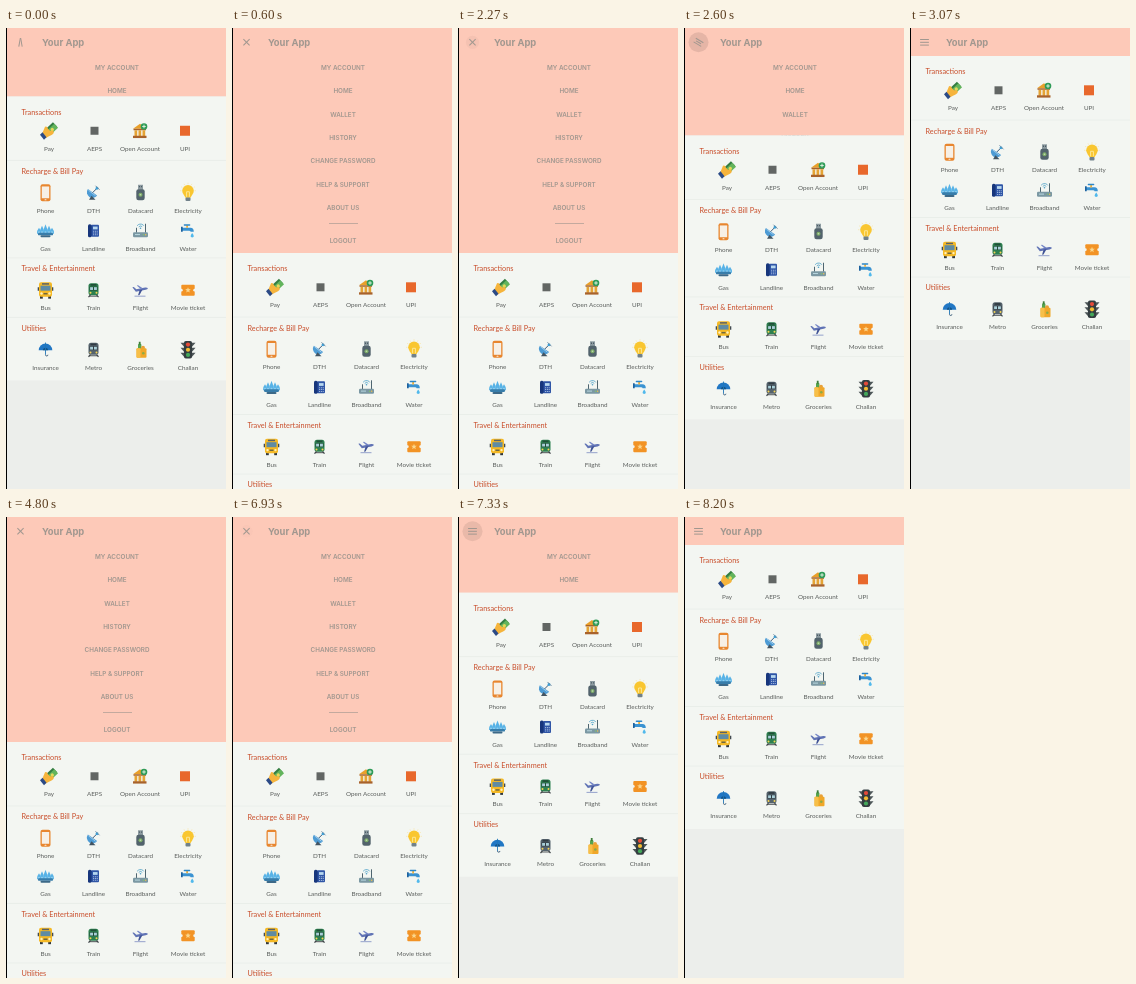
Recreate the animation shown at these times as an HTML page with a canvas. Size 220 by 461 pixels, loop 8.27 s.

```html
<!DOCTYPE html>
<html lang="en">
<head>
<meta charset="utf-8">
<title>Backdrop menu</title>
<style>
html, body { margin: 0; width: 100%; height: 100%; overflow: hidden; background: #eceeeb; }
canvas { display: block; width: 220px; height: 461px; }
</style>
</head>
<body>
<canvas id="stage"></canvas>
<script>
const W = 220, H = 461, LOOP = 8270;
const SLIDE = 740, SPIN = 350;
const CLOSED = 28, OPENED = 225;
const INK = '#a1978f', PINK = '#fdc9b8';
const LABEL_FONT = 'Lato, "Open Sans", sans-serif';
const MENU_FONT = 'Inter, "Open Sans", sans-serif';
const moves = [[-175, 1], [2310, 0], [4072, 1], [6970, 0]];
const presses = [2240, 4060, 6920];

const canvas = document.getElementById('stage');
const dpr = window.devicePixelRatio || 1;
canvas.width = W * dpr;
canvas.height = H * dpr;
const ctx = canvas.getContext('2d');

const clamp = (v) => Math.max(0, Math.min(1, v));

// cubic-bezier(.4, 0, .2, 1), solved by bisection
function ease(u) {
  let lo = 0, hi = 1, s = u;
  for (let i = 0; i < 24; i++) {
    s = (lo + hi) / 2;
    const x = 1.2 * s * (1 - s) ** 2 + 0.6 * s * s * (1 - s) + s ** 3;
    if (x < u) lo = s; else hi = s;
  }
  return 3 * s * s - 2 * s ** 3;
}

function rect(color, x, y, w, h, r = 0) {
  ctx.fillStyle = color;
  ctx.beginPath();
  ctx.roundRect(x, y, w, h, r);
  ctx.fill();
}

function disc(color, x, y, r, from = 0, to = Math.PI * 2) {
  ctx.fillStyle = color;
  ctx.beginPath();
  ctx.arc(x, y, r, from, to);
  ctx.fill();
}

function trace(pts) {
  ctx.beginPath();
  for (let i = 0; i < pts.length; i += 2) ctx.lineTo(pts[i], pts[i + 1]);
}

function poly(color, ...pts) {
  ctx.fillStyle = color;
  trace(pts);
  ctx.fill();
}

function line(color, width, ...pts) {
  ctx.strokeStyle = color;
  ctx.lineWidth = width;
  trace(pts);
  ctx.stroke();
}

function arc(color, width, x, y, r, from, to) {
  ctx.strokeStyle = color;
  ctx.lineWidth = width;
  ctx.beginPath();
  ctx.arc(x, y, r, from, to);
  ctx.stroke();
}

function path(color, d) {
  ctx.fillStyle = color;
  ctx.fill(new Path2D(d));
}

function at(x, y, angle, draw) {
  ctx.save();
  ctx.translate(x, y);
  ctx.rotate(angle);
  draw();
  ctx.restore();
}

function text(str, x, y, font, color, align = 'center') {
  ctx.font = font;
  ctx.fillStyle = color;
  ctx.textAlign = align;
  ctx.fillText(str, x, y);
}

function trainFront(body, trim) {
  rect(body, -5, -7, 10, 12, 2.5);
  rect(trim, -3, -6.2, 6, 1.8);
  rect(trim, -4, -3.6, 8, 4);
  rect('#a9cfd8', -3.4, -3, 2.9, 2.8);
  rect('#a9cfd8', 0.5, -3, 2.9, 2.8);
  disc('#f7d455', -3, 2.7, 1);
  disc('#f7d455', 3, 2.7, 1);
  line('#3d4246', 1.2, -3, 4.8, -5, 7);
  line('#3d4246', 1.2, 3, 4.8, 5, 7);
  line('#3d4246', 0.9, -4, 6, 4, 6);
}

const icons = {
  Pay() {
    at(3, -1.5, -0.75, () => {
      rect('#347d42', -5.5, -4.5, 11, 6);
      rect('#62b45c', -5.5, -2.5, 11, 5.5);
      disc('#e4d75a', 0, 0.4, 1.7);
    });
    path('#f6b43c', 'M-6.5 2L-4 -4Q-2 -5 -1 -2L1 0L4 0Q6 2 3 4L-1 6L-3.5 7.5Z');
    poly('#2b4a86', -9, 4, -6.5, 1.5, -2.5, 6.5, -5, 9);
  },
  AEPS() { rect('#626664', -4, -4, 8, 8); },
  'Open Account'() {
    poly('#e9a02b', -7, -2, 0, -7, 6, -2);
    rect('#a8622b', -6.5, -2, 12.5, 1.5);
    for (const x of [-5.5, -1.5, 2.5]) rect('#e5a334', x, -0.5, 2.7, 6);
    rect('#a8622b', -7, 5, 13.5, 2.3);
    disc('#2e9b57', 4, -4.3, 3.3);
    line('#e8f5e8', 0.9, 2.2, -4.3, 5.8, -4.3);
    line('#e8f5e8', 0.9, 4, -6.1, 4, -2.5);
  },
  UPI() { rect('#e8682c', -5, -5, 10, 10); },
  Phone() {
    rect('#e8862f', -5, -8.5, 10, 17, 2);
    rect('#f7f0e6', -3.7, -6.3, 7.4, 11.8);
    rect('#f7f0e6', -1, 6.4, 2, 1, 0.5);
  },
  DTH() {
    disc('#4d9bd4', -1, -0.5, 5.6, 0.6, 0.6 + Math.PI);
    line('#38597a', 1, -1, 0, 3.5, -4.5);
    disc('#35a2dd', 3.5, -4.5, 1.4);
    line('#6f8ba2', 1, 2, -7, 6, -3);
    poly('#425462', -2, 3, 2, 7, -4.5, 7);
    line('#a6d0ea', 0.9, -5, -2.5, 2, 3);
  },
  Datacard() {
    rect('#8d9ba1', -2.5, -8, 5, 5);
    rect('#4c5c65', -1.5, -6.7, 1, 1.3);
    rect('#4c5c65', 0.5, -6.7, 1, 1.3);
    rect('#52636c', -4.2, -3.5, 8.4, 11, 2.2);
    disc('#7dae67', 0, 2, 2);
    disc('#c4d8ba', 0, 2, 0.8);
  },
  Electricity() {
    for (let i = 0; i < 7; i++) {
      const a = Math.PI * (1 + i / 6), c = Math.cos(a), s = Math.sin(a);
      line('#f8e7b0', 0.8, 6.5 * c, -2 + 6.5 * s, 8 * c, -2 + 8 * s);
    }
    disc('#f9c630', 0, -2, 5.8);
    poly('#f9c630', -4.5, 1.5, 4.5, 1.5, 2.5, 5, -2.5, 5);
    rect('#71818a', -2.5, 4.8, 5, 3.4, 1);
    line('#fdeaa0', 0.9, -1.4, 4, -1.4, -1, 1.4, -1, 1.4, 4);
  },
  Gas() {
    for (const [x, h] of [[-6.5, 6], [-3.5, 8], [0, 9.5], [3.5, 8], [6.5, 6]]) {
      path('#57b2e6', `M${x - 2} 3Q${x - 2.5} ${3 - h / 2} ${x} ${3 - h}Q${x + 2.5} ${3 - h / 2} ${x + 2} 3Z`);
      disc('#8fcdee', x, 1.5, 1);
    }
    rect('#387daa', -7.5, 2, 15, 2.6, 1.2);
    rect('#3c6988', -5, 4.6, 10, 2, 1);
  },
  Landline() {
    rect('#2f55a6', -2.5, -6, 8, 12, 1);
    rect('#17367c', -5.5, -6.5, 3.6, 13, 1.6);
    rect('#b6d7ef', -0.5, -4.2, 4.6, 2.8);
    for (let i = 0; i < 9; i++) rect('#a9bfe0', -0.4 + (i % 3) * 1.8, 0 + Math.floor(i / 3) * 1.8, 1, 1);
  },
  Broadband() {
    line('#4e6570', 1, -4, 2, -4, -3);
    line('#4e6570', 1, 5, 2, 5, -7);
    for (const r of [2.2, 4.2]) arc('#4ba0c7', 0.8, 0, -2.5, r, -2.5, -0.64);
    disc('#4ba0c7', 0, -2.5, 0.8);
    rect('#7b98a3', -7.5, 1.5, 15, 5, 1.2);
    rect('#b9d7df', -5.5, 3.3, 5, 1);
    disc('#80c36a', 3, 4, 0.7);
    disc('#f3c247', 5.2, 4, 0.7);
  },
  Water() {
    path('#3a93d2', 'M-6.5 -3H2.5Q5.8 -3 5.8 1H2.6Q2.6 0 1 0H-6.5Z');
    rect('#1d629f', -7, -4, 1.7, 5);
    rect('#f0b23c', -1.8, -5.5, 1.8, 2.6);
    rect('#2c86c8', -4.3, -6.6, 6.6, 1.5, 0.7);
    path('#51b9ec', 'M4.2 2.3Q7.4 6.5 4.2 6.8Q1 6.5 4.2 2.3Z');
  },
  Bus() {
    rect('#30383e', -5.5, 5, 2.8, 3.5);
    rect('#30383e', 2.7, 5, 2.8, 3.5);
    rect('#f5b925', -6.5, -8, 13, 14.5, 2);
    rect('#5a6268', -3.5, -7, 7, 1.5);
    rect('#5f8ba3', -5, -4.5, 10, 5);
    disc('#fff1bd', -4, 3.4, 1.2);
    disc('#fff1bd', 4, 3.4, 1.2);
    rect('#6d6640', -2, 2.8, 4, 1.5);
    rect('#424a50', -7.8, -3, 1.3, 3.5);
    rect('#424a50', 6.5, -3, 1.3, 3.5);
  },
  Train() { trainFront('#2d8050', '#204f38'); },
  Flight() {
    at(0, -0.5, -0.2, () => {
      path('#6073b5', 'M-7.5 -4L-6 -4L-4 -1.2H5Q7.5 -0.8 7.5 0.3Q7 1.2 5 1.2H-5Z');
      poly('#3f5295', -1, 0.3, 2, 0.3, -2, 5, -3.5, 5);
      poly('#7384c5', 0, -1, 2.5, -1, -1.5, -4.8, -2.8, -4.8);
    });
    line('#8b98c8', 0.9, -6, 6, 5, 6);
  },
  'Movie ticket'() {
    rect('#f29325', -6.7, -5.5, 13.4, 11, 1);
    disc('#f3f6f2', -6.7, 0, 1.4);
    disc('#f3f6f2', 6.7, 0, 1.4);
    const star = [];
    for (let i = 0; i < 10; i++) {
      const a = i * Math.PI / 5 - Math.PI / 2, r = i % 2 ? 1.3 : 3;
      star.push(r * Math.cos(a), r * Math.sin(a));
    }
    poly('#fbd68c', ...star);
  },
  Insurance() {
    disc('#2177c4', 0, 0.5, 6.8, Math.PI, Math.PI * 2);
    disc('#135489', 0, 0.5, 2.6, Math.PI, Math.PI * 2);
    line('#2177b7', 0.9, 0, -7.2, 0, 5);
    arc('#355777', 0.9, 1.2, 5, 1.2, 0, Math.PI);
  },
  Metro() { trainFront('#55636d', '#303b43'); },
  Groceries() {
    rect('#55a44e', -2.5, -6, 3.4, 7, 1.2);
    rect('#3d7e39', -1.7, -8, 1.8, 3);
    disc('#e8a13a', 2.5, -2, 2);
    rect('#f0a729', -4, -1.5, 10, 9.5, 1);
    rect('#f7bf48', -4, -1.5, 4, 9.5, 1);
    disc('#8cab45', 2.8, 3.5, 1.3);
  },
  Challan() {
    for (const y of [-7, -2, 3]) {
      poly('#4d5658', -7.5, y, 7.5, y, 4, y + 4, -4, y + 4);
    }
    rect('#343d40', -4, -8.7, 8, 17.4, 1.8);
    disc('#e44b39', 0, -5.2, 2.1);
    disc('#f4bd32', 0, 0, 2.1);
    disc('#43a75a', 0, 5.2, 2.1);
  }
};

const columns = [39.5, 87.5, 134.5, 182];
const rows = [
  { y: 34.3, xs: [43, 88.5, 134, 179], names: ['Pay', 'AEPS', 'Open Account', 'UPI'] },
  { y: 96.3, xs: columns, names: ['Phone', 'DTH', 'Datacard', 'Electricity'] },
  { y: 134.3, xs: columns, names: ['Gas', 'Landline', 'Broadband', 'Water'] },
  { y: 193.7, xs: columns, names: ['Bus', 'Train', 'Flight', 'Movie ticket'] },
  { y: 253.3, xs: columns, names: ['Insurance', 'Metro', 'Groceries', 'Challan'] }
];
const titles = [['Transactions', 18.3], ['Recharge & Bill Pay', 77.5],
  ['Travel & Entertainment', 175], ['Utilities', 234.3]];
const menu = ['MY ACCOUNT', 'HOME', 'WALLET', 'HISTORY', 'CHANGE PASSWORD', 'HELP & SUPPORT', 'ABOUT US'];

function drawMenuIcon(p) {
  const cross = clamp((p - 0.43) / 0.31);
  const half = 4.4, gap = 2.8 * (1 - clamp(p / 0.74)), tilt = cross * Math.PI / 4;
  at(14.5, 14.3, p * Math.PI, () => {
    for (const side of [-1, 1]) {
      at(0, side * gap, side * tilt, () => line(INK, 1, -half, 0, half, 0));
    }
    const middle = half * (1 - clamp(p / 0.5));
    line(INK, 1, -middle, 0, middle, 0);
  });
}

function drawRipple(age) {
  if (age < 0 || age > 650) return;
  const alpha = 0.14 * clamp(age / 90) * clamp((650 - age) / 300);
  disc(`rgba(80,60,55,${alpha})`, 14.5, 14.3, 6 + 4 * clamp(age / 200));
}

function drawBack(t, spin) {
  const itemFont = `600 6.3px ${MENU_FONT}`;
  rect(PINK, 0, 0, W, OPENED + 1);
  presses.forEach((press) => drawRipple(t - press));
  drawMenuIcon(spin);
  text('Your App', 36, 18.1, `bold 9.4px ${MENU_FONT}`, INK, 'left');
  menu.forEach((item, i) => text(item, 111, 42 + i * 23.3, itemFont, INK));
  line('#b5a198', 0.8, 97, 195.5, 126, 195.5);
  text('LOGOUT', 111, 215, itemFont, INK);
}

function drawFront(top) {
  rect('#eceeeb', 0, top, W, H);
  rect('#f3f6f2', 0, top, W, 284);
  at(0, top, 0, () => {
    for (const y of [64, 161.5, 221]) line('#e8ece8', 0.8, 0, y, W, y);
    for (const [name, y] of titles) text(name, 15.5, y, `7.3px ${LABEL_FONT}`, '#c94e2b', 'left');
    for (const { y, xs, names } of rows) {
      names.forEach((name, i) => {
        at(xs[i], y, 0, icons[name]);
        text(name, xs[i], y + 19.9, `6.3px ${LABEL_FONT}`, '#595d5b');
      });
    }
  });
}

function draw(now) {
  const t = now % LOOP;
  const [start, opening] = moves.filter((m) => m[0] <= t).pop();
  const progress = (p) => opening ? p : 1 - p;
  const slide = progress(ease(clamp((t - start) / SLIDE)));
  const spin = progress(clamp((t - start) / SPIN));
  ctx.setTransform(dpr, 0, 0, dpr, 0, 0);
  drawBack(t, spin);
  drawFront(CLOSED + (OPENED - CLOSED) * slide);
  rect('#000', 0, 0, 1, H);
}

let origin;
function tick(now) {
  origin ??= now;
  draw(now - origin);
  requestAnimationFrame(tick);
}
requestAnimationFrame(tick);
</script>
</body>
</html>
```
